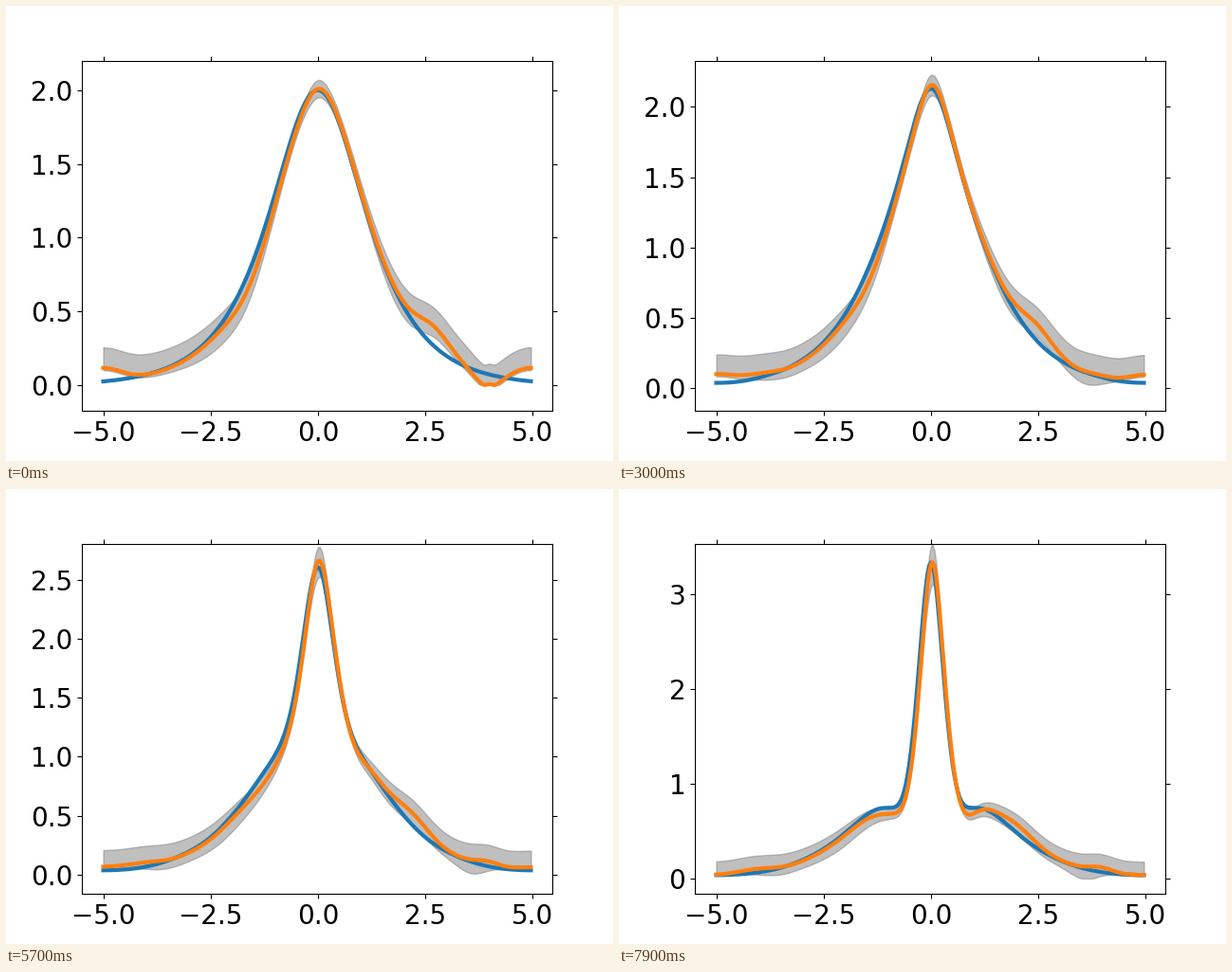
These frames come from a looping animation (640x480 px, 8 s). A matplotlib script:

```python
import numpy as np
import matplotlib.pyplot as plt
from matplotlib.animation import FuncAnimation

FRAMES, HOLD, STEP_MS = 80, 4, 100
LAST = FRAMES - HOLD - 1
DT = np.pi / 400
SUB = 20
SPAN = 10.0

x = np.linspace(-5, 5, 257)[:-1]


def solve():
    """|h| of the periodic nonlinear Schroedinger equation, h(x, 0) = 2 sech x."""
    k = 2 * np.pi * np.fft.fftfreq(x.size, SPAN / x.size)
    dt = DT / SUB
    drift = np.exp(-0.5j * k ** 2 * dt)
    h = 2 / np.cosh(x) + 0j
    rows = [np.abs(h)]
    for _ in range(LAST):
        for _ in range(SUB):
            h = h * np.exp(0.5j * dt * np.abs(h) ** 2)
            h = np.fft.ifft(drift * np.fft.fft(h))
            h = h * np.exp(0.5j * dt * np.abs(h) ** 2)
        rows.append(np.abs(h))
    return np.array(rows)


def bump(center, width, pos=x):
    return np.exp(-((pos - center) / width) ** 2)


def predict(true, f):
    """The solution pushed to the right, with slowly drifting bumps of error."""
    settle = np.exp(-f / 0.3)
    shift = 0.035 - 0.02 * np.tanh(2 * x)
    guess = np.interp(x - shift, x, true, period=SPAN)
    guess += (0.01 + 0.05 * np.sin(np.pi * f ** 2)) * bump(0, 0.25)
    guess -= 0.065 * bump(-1.6 + 0.6 * f, 0.55)
    guess -= 0.08 * f ** 2 * bump(0.85, 0.3)
    guess += (0.13 - 0.045 * f) * bump(2.7 - 0.65 * f, 0.55)
    guess += (0.055 - 0.145 * settle) * bump(3.95, 0.4)
    guess += 0.045 * (1 - settle) * bump(-4.1, 0.6)
    guess += 0.09 * (1 - f) * bump(5, 0.6, np.abs(x))
    return np.abs(guess)


def spread(true, f):
    """Distances from the prediction to the lower and upper band edge."""
    growth = (true.max() - 2) / 1.33 * bump(0, 0.2)
    up = 0.14 - 0.1 * bump(0, 2) + 0.02 * bump(0, 0.3) + 0.13 * growth
    down = 0.015 + 0.09 * bump(2, 1.1, np.abs(x)) + 0.04 * bump(0, 0.5)
    down += np.sqrt(f) * (0.11 * bump(3.65, 0.5) + 0.055 * bump(-3.7, 0.7))
    return down + 0.18 * growth, up


exact = solve()

fig, ax = plt.subplots(figsize=(6.4, 4.8), dpi=100)
ax.tick_params(labelsize=20, top=True, right=True)
pad = 0.05 * (x[-1] - x[0])
ax.set_xlim(x[0] - pad, x[-1] + pad)
band = ax.fill_between(x, 0 * x, 0 * x + 1, color="grey", alpha=0.5)
true_line, = ax.plot(x, x, lw=3, color="C0")
guess_line, = ax.plot(x, x, lw=3, color="C1")


def draw(n):
    step = max(0, n - HOLD)
    f = step / LAST
    true = exact[step]
    guess = predict(true, f)
    down, up = spread(true, f)
    low = np.maximum(guess - down, 0.004)
    true_line.set_ydata(true)
    guess_line.set_ydata(guess)
    edge = np.r_[low, (guess + up)[::-1]]
    band.set_verts([np.column_stack([np.r_[x, x[::-1]], edge])])
    ax.set_ylim(true.min() - 0.2, true.max() + 0.2)
    return band, true_line, guess_line


anim = FuncAnimation(fig, draw, frames=FRAMES, interval=STEP_MS,
                     repeat=True, repeat_delay=0, blit=False)
plt.show()
```
